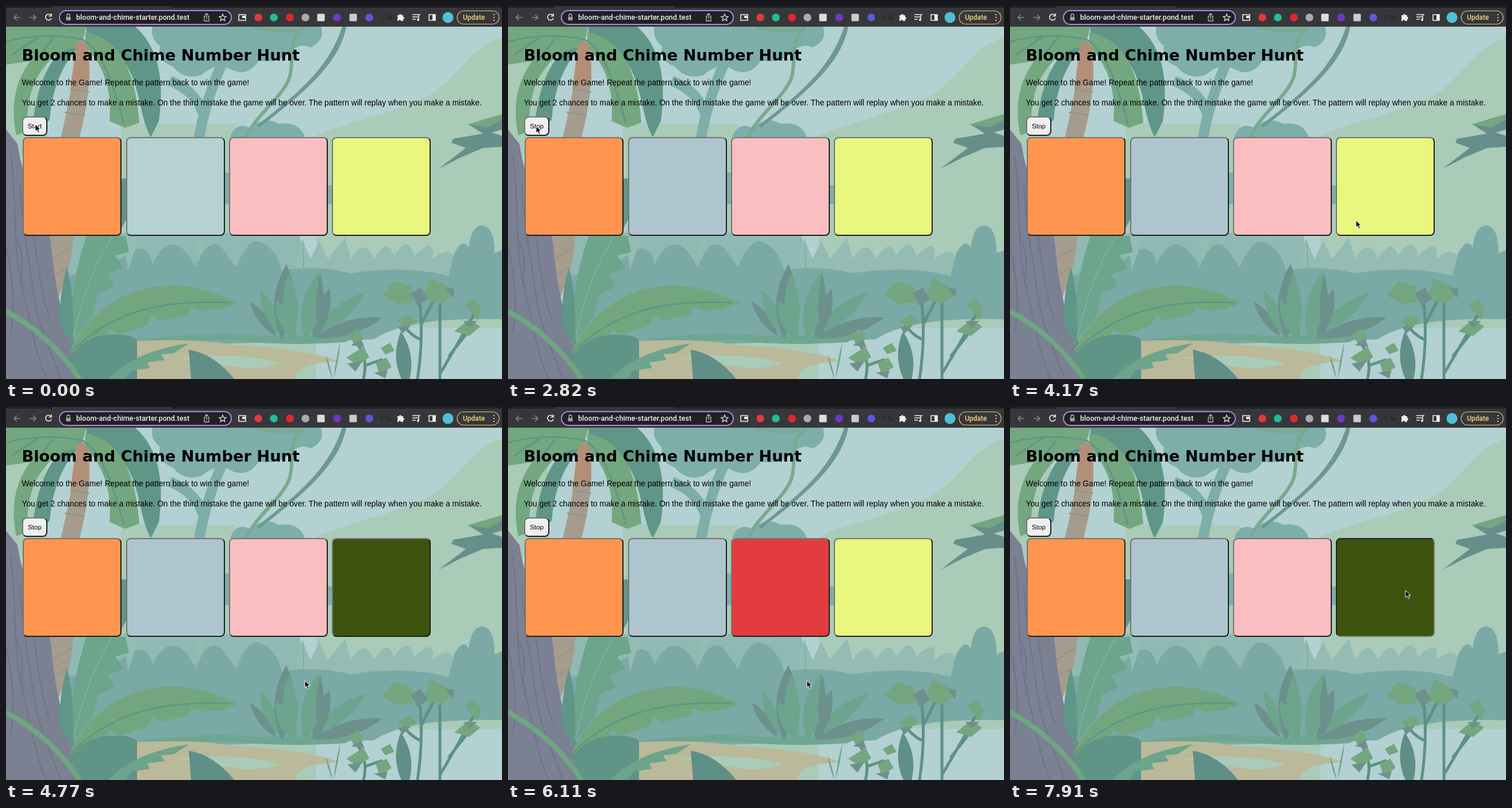
These frames come from a looping animation (863 px wide and 649 px high, 8000 ms). An HTML page:

```html
<!DOCTYPE html>
<html lang="en">
<head>
<meta charset="utf-8">
<title>Bloom and Chime</title>
<style>
  html, body { margin: 0; width: 100%; height: 100%; overflow: hidden; }
  #stage { position: relative; width: 863px; height: 649px; overflow: hidden; }
  svg { position: absolute; left: 0; top: 0; }
  .key {
    position: absolute; box-sizing: border-box; border: 2px solid;
    border-color: #747474 #1c1f1f #1c1f1f #747474; border-radius: 8px;
  }
  .pad { top: 228px; width: 172px; height: 172px; }
  #toggle { left: 28px; top: 192px; width: 44px; height: 34px; background: #efeff0; }
  #toggle span {
    position: absolute; inset: 0; text-align: center;
    font: 11.6px/30px "Liberation Sans", Arial, sans-serif;
  }
  .copy { font: 13.75px "Liberation Sans", Arial, sans-serif; }
  .bar { font: 500 12.6px Roboto, sans-serif; }
</style>
</head>
<body>
<div id="stage">
<svg width="863" height="649" viewBox="0 0 863 649">
  <rect width="863" height="649" fill="#b3d1d2"/>

  <!-- distance -->
  <path fill="#a9cbb8" d="M863 55C810 70 790 120 745 150S600 200 540 225V649H863ZM0 36H70V260H0ZM200 205H400V400H200ZM200 560H863V649H200Z"/>
  <path fill="#8fb9b2" d="M90 395H510L525 480H90Z"/>
  <path fill="#94bcb3" d="M500 475L515 405L530 440L545 408L560 440L590 403L600 440Q625 400 640 440Q665 400 675 435Q700 395 710 435Q748 398 742 440Q775 412 785 450V500H500Z"/>
  <path fill="#7ba9a6" d="M110 590V470L200 440Q245 400 255 450Q270 415 290 415Q310 415 330 455Q350 400 375 420Q390 440 400 455Q420 405 440 410Q470 420 480 460Q540 450 600 465Q700 450 770 470L780 430Q795 402 805 420Q810 380 830 382Q850 385 850 430L863 425V545Q700 540 640 580L300 590Z"/>
  <path fill="#94bcb3" d="M330 405L348 402L336 445ZM205 402H232L212 460ZM420 402L470 402L448 412Z"/>
  <path fill="#6fa691" d="M228 582Q340 566 420 572T625 568L590 585Q480 592 400 582Z"/>
  <path fill="#bab99a" d="M228 583Q330 578 400 590Q520 596 580 618Q500 622 505 649H228Z"/>
  <path fill="#a9cbb8" d="M300 612Q400 600 480 622Q430 635 400 628Q350 622 300 612Z"/>

  <!-- canopy -->
  <path fill="#7eaeaa" d="M255 36H548Q556 60 530 72Q510 62 490 85Q470 100 440 95Q420 125 390 110Q370 95 340 120Q310 130 290 105Q262 95 268 70Q250 55 255 36Z"/>
  <path fill="none" stroke="#7eaeaa" stroke-width="18" d="M335 235Q345 170 376 100M285 130Q335 150 345 195"/>
  <path fill="#7eaeaa" d="M390 228Q400 200 425 212Q450 190 475 205Q510 200 520 228ZM381 290H388V345H381ZM560 312H567V345H560Z"/>
  <path fill="none" stroke="#7aa98e" stroke-width="6" d="M518 36C488 62 502 90 494 122S430 195 418 228M508 40Q480 48 430 36"/>
  <path fill="#6d9894" d="M585 36H592C580 100 520 150 440 212L436 208C510 150 560 110 585 36Z"/>
  <path fill="#668f8b" d="M753 283L800 247L775 238L778 231L830 222L803 205L825 208L863 188V215L845 220L863 226V245L830 247L790 264Z"/>
  <path fill="#74a67f" d="M803 206L863 188V198L838 211Z"/>

  <!-- palm -->
  <path fill="#5f9688" d="M140 36H225C262 70 277 120 266 200L252 228C230 190 235 130 200 90Q170 60 140 60Z"/>
  <path fill="#74a77f" d="M138 46C190 55 225 100 232 203L207 212L180 200C185 150 170 100 138 72Z"/>
  <path fill="#5f9688" d="M108 66Q52 110 45 225L76 198Q82 120 125 72Z"/>
  <path fill="#74a77f" d="M0 36H140L130 72Q90 72 62 112Q36 145 36 218L18 225Q2 150 42 96L0 102Z"/>
  <path fill="none" stroke="#5f9688" stroke-width="3" d="M0 62Q65 45 132 58Q172 75 205 205M10 85L55 55M50 98L82 56"/>
  <path fill="#a69c8d" d="M122 66Q140 54 143 78C150 130 138 190 128 228L117 400C116 440 104 475 90 510L78 500V300C92 240 118 150 122 66Z"/>
  <path fill="#b28f78" d="M122 66Q140 54 143 78L145 128L112 146Z"/>
  <path fill="none" stroke="#8e938b" stroke-width="2" d="M113 145L145 150M102 185L137 190M80 440L113 420M82 470L106 455"/>
  <path fill="#7b8092" d="M0 215L20 240Q32 320 76 385Q82 480 100 540Q125 600 150 649H0Z"/>
  <path fill="none" stroke="#6d7388" stroke-width="2" d="M8 260C20 340 10 420 30 500S50 600 70 649M24 310C30 400 40 440 48 500S75 590 95 649M46 385C56 450 60 500 78 550M0 420Q20 500 8 570M15 400C40 440 20 475 30 490"/>

  <!-- undergrowth -->
  <path fill="#6ca48c" d="M110 590C110 520 120 460 140 400H208L214 428L190 434L204 456L176 466L188 488L160 500L150 540Z"/>
  <path fill="#5f9688" d="M106 455Q120 500 116 592L94 555Q92 500 106 455ZM200 300H209V372L200 388Z"/>
  <path fill="none" stroke="#7eaeaa" stroke-width="2" d="M118 575Q140 470 185 400"/>
  <path fill="#73a67f" d="M108 606C150 520 220 484 300 487Q350 490 403 517L372 528L340 530L322 524L318 537L268 548L254 538L246 556L196 572L180 562L172 582Z"/>
  <path fill="none" stroke="#609783" stroke-width="3" d="M108 606C180 535 260 510 390 516"/>
  <path fill="#5f9486" d="M110 612Q135 574 180 572Q220 570 228 582V649H122Z"/>
  <path fill="none" stroke="#6da680" stroke-width="9" d="M0 531Q80 575 128 649"/>
  <path fill="#6ca48c" d="M178 649Q225 600 318 587L292 604L270 606L276 616L246 620L250 630L218 634L208 649Z"/>
  <path fill="#5f8f87" d="M318 598Q362 605 397 649H322Z"/>
  <g id="leaves"></g>
  <path fill="none" stroke="#5e9185" stroke-width="5" d="M716 649Q728 570 718 500M720 580Q700 570 690 552M722 555L745 510M755 649V500M755 640Q785 590 818 530M770 610L803 568M622 649Q632 610 605 580M626 625L655 615"/>
  <path fill="#74a67f" d="M655 503L676 478L706 488L708 516L680 518ZM726 510L738 474L776 492L780 500L756 518ZM798 520L814 509L827 527L820 546ZM680 548L702 537L714 548L698 560ZM780 566L806 545L825 558L806 574ZM597 572L612 561L622 580L606 590ZM592 612L622 593L632 611L612 625ZM643 620L662 612L671 628L650 642ZM652 595L668 586L676 600L660 606Z"/>
  <path fill="#6f918c" d="M704 500L722 490L734 510L716 522ZM764 490L780 492L778 508ZM796 548L820 548L806 560ZM682 558L704 556L690 570ZM600 590L618 580L624 594ZM594 622L620 618L608 636ZM640 638L664 634L660 648Z"/>

  <!-- browser bar -->
  <rect width="863" height="36" fill="#36373a"/>
  <path fill="#202124" d="M0 0H80V3H0ZM288 0H863V3H288Z"/>
  <rect x="93" y="8" width="299" height="24" rx="12" fill="#202124" stroke="#b583e6" stroke-width="2"/>
  <g fill="none" stroke="#85878a" stroke-width="1.6">
    <path d="M25 20H14M19 15L14 20L19 25M41 20H52M47 15L52 20L47 25"/>
    <path stroke="#eee" d="M78 16A5.2 5.2 0 1 0 79 21M79 13V17.5H74.5"/>
    <path stroke="#bbb" stroke-width="1.3" d="M347 18H345V26H353V18H351M349 23V13M346 16L349 13L352 16M106 19V16.5A2.3 2.3 0 0 1 111 16.5V19"/>
    <path stroke="#ddd" stroke-width="1.3" d="M377 14L378.7 18.2L383 18.5L379.7 21.2L380.8 25.5L377 23.1L373.2 25.5L374.3 21.2L371 18.5L375.3 18.2Z"/>
    <path stroke="#eee" d="M405 15H417V25H405ZM736 15H747V25H736ZM707 15H717M707 19H717M707 23H713M718 24V15H721"/>
  </g>
  <path fill="#eee" d="M411 17H416V21H411ZM742 15H747V25H742ZM681 16H684A2 2 0 0 1 688 16H691V19A2 2 0 0 1 691 23V26H687A2 2 0 0 0 683 26H681V22A2 2 0 0 0 681 19Z"/>
  <circle cx="717" cy="24" r="2" fill="#eee"/>
  <rect x="104.5" y="19" width="8" height="6" rx="1" fill="#9aa0a6"/>
  <g id="marks"></g>
  <text x="651" y="24" font-size="11" font-family="Roboto, sans-serif" fill="#1f2022">1.5x</text>
  <rect x="785" y="8.5" width="73" height="23" rx="11.5" fill="#36373a" stroke="#e9c46f" stroke-width="1.2"/>
  <text class="bar" x="795" y="24.3" style="font-size:12px" fill="#f8d57e">Update</text>
  <path fill="#f8d57e" d="M848 14h2v2h-2zm0 5h2v2h-2zm0 5h2v2h-2z"/>
  <text class="bar" x="122" y="24.3" fill="#f1f1f2">bloom-and-chime-starter.pond.test</text>

  <!-- page copy -->
  <text x="27.5" y="94.5" font-family="DejaVu Sans, Verdana, sans-serif" font-weight="700" font-size="27.25">Bloom and Chime Number Hunt</text>
  <text class="copy" x="27.5" y="138">Welcome to the Game! Repeat the pattern back to win the game!</text>
  <text class="copy" x="27.5" y="172.7">You get 2 chances to make a mistake. On the third mistake the game will be over. The pattern will replay when you make a mistake.</text>
</svg>

<div id="toggle" class="key"><span id="start">Start</span><span id="stop">Stop</span></div>

<svg id="cursor" width="13" height="18" viewBox="0 0 13 18">
  <path d="M1 1V13.2L3.9 10.6L6 15.4L8.2 14.4L6.1 9.8H10Z" stroke="#fff" stroke-width="1"/>
</svg>
</div>

<script>
const LOOP = 8000;
const $ = id => document.getElementById(id);

function addShape(parent, tag, attrs) {
  const el = document.createElementNS('http://www.w3.org/2000/svg', tag);
  for (const name in attrs) el.setAttribute(name, attrs[name]);
  parent.append(el);
}

// Pointed leaf from base (x, y) to tip (tx, ty), bulging by w on each side.
function leaf(x, y, tx, ty, w, fill) {
  const len = Math.hypot(tx - x, ty - y);
  const mx = (x + tx) / 2, my = (y + ty) / 2;
  const nx = -(ty - y) / len * w, ny = (tx - x) / len * w;
  const d = `M${x} ${y}Q${mx + nx} ${my + ny} ${tx} ${ty}Q${mx - nx} ${my - ny} ${x} ${y}`;
  addShape($('leaves'), 'path', { d, fill });
}

const green = '#6ca48d', gray = '#6c918c';
[
  [535, 578, 655, 542, 24, gray],
  [530, 575, 626, 498, 25, green],
  [535, 580, 563, 492, 24, gray],
  [470, 575, 424, 514, 16, gray],
  [478, 575, 442, 494, 20, green],
  [480, 580, 488, 449, 34, gray],
  [497, 582, 492, 466, 26, green],
  [520, 582, 545, 463, 34, green],
  [546, 580, 547, 465, 14, gray],
  [505, 584, 470, 512, 24, green],
  [697, 665, 687, 566, 26, '#5f8f87'],
  [568, 649, 556, 606, 3, green],
  [570, 649, 582, 584, 3, green],
  [518, 480, 517, 402, 2, '#7ba9a6']
].forEach(args => leaf(...args));

[
  [439, '#e5383f'], [466, '#20bf8f'], [494, '#e3262c'], [521, '#a9abac'],
  [576, '#7336c8'], [632, '#5b58dc'], [769, '#4fc0d4', 9.5]
].forEach(([cx, fill, r = 6.8]) => addShape($('marks'), 'circle', { cx, cy: 20, r, fill }));
[[548, '#dcddde'], [604, '#c9cacb']].forEach(([x, fill]) =>
  addShape($('marks'), 'rect', { x: x - 6.5, y: 13.5, width: 13, height: 13, rx: 1.5, fill }));

const [, blue, pink, yellow] = [[29, '#ff954f'], [209, '#b6d1d2'], [388, '#fabec1'], [567, '#e9f77f']]
  .map(([left, background]) => {
    const pad = document.createElement('div');
    pad.className = 'key pad';
    Object.assign(pad.style, { left: left + 'px', background });
    $('stage').insertBefore(pad, $('cursor'));
    return pad;
  });

// Each step [ms, value] holds until the next one.
function play(el, prop, steps) {
  const frames = steps.map(([ms, value]) => ({ offset: ms / LOOP, [prop]: value, easing: 'steps(1, end)' }));
  frames.push({ offset: 1, [prop]: steps.at(-1)[1] });
  el.animate(frames, { duration: LOOP, iterations: Infinity }).startTime = 0;
}

const raised = '#747474 #1c1f1f #1c1f1f #747474';
const pressed = '#1c1f1f #747474 #747474 #1c1f1f';
const bright = '#e9f77f', dark = '#3c530e';

play(yellow, 'backgroundColor', [
  [0, bright], [1780, dark], [2820, bright], [3570, dark],
  [3870, bright], [4770, dark], [5810, bright], [7910, dark]
]);
play(yellow, 'borderColor', [[0, raised], [3570, pressed], [3870, raised], [7910, pressed]]);
play(pink, 'backgroundColor', [[0, '#fabec1'], [6110, '#e33c3e'], [7160, '#fabec1']]);
play(blue, 'backgroundColor', [[0, '#b6d1d2'], [1780, '#aec5cf']]);
play($('toggle'), 'borderColor', [[0, raised], [740, pressed], [880, raised]]);
play($('start'), 'opacity', [[0, 1], [880, 0]]);
play($('stop'), 'opacity', [[0, 0], [880, 1]]);
play($('cursor'), 'transform', [
  [0, 50, 205], [300, 49, 208], [440, 48, 208], [3120, 122, 207], [3270, 618, 349],
  [3420, 617, 348], [4170, 601, 372], [4320, 519, 475], [7310, 548, 450],
  [7460, 763, 281], [7610, 753, 287], [7760, 687, 318]
].map(([ms, x, y]) => [ms, `translate(${x}px, ${y}px)`]));
</script>
</body>
</html>
```
